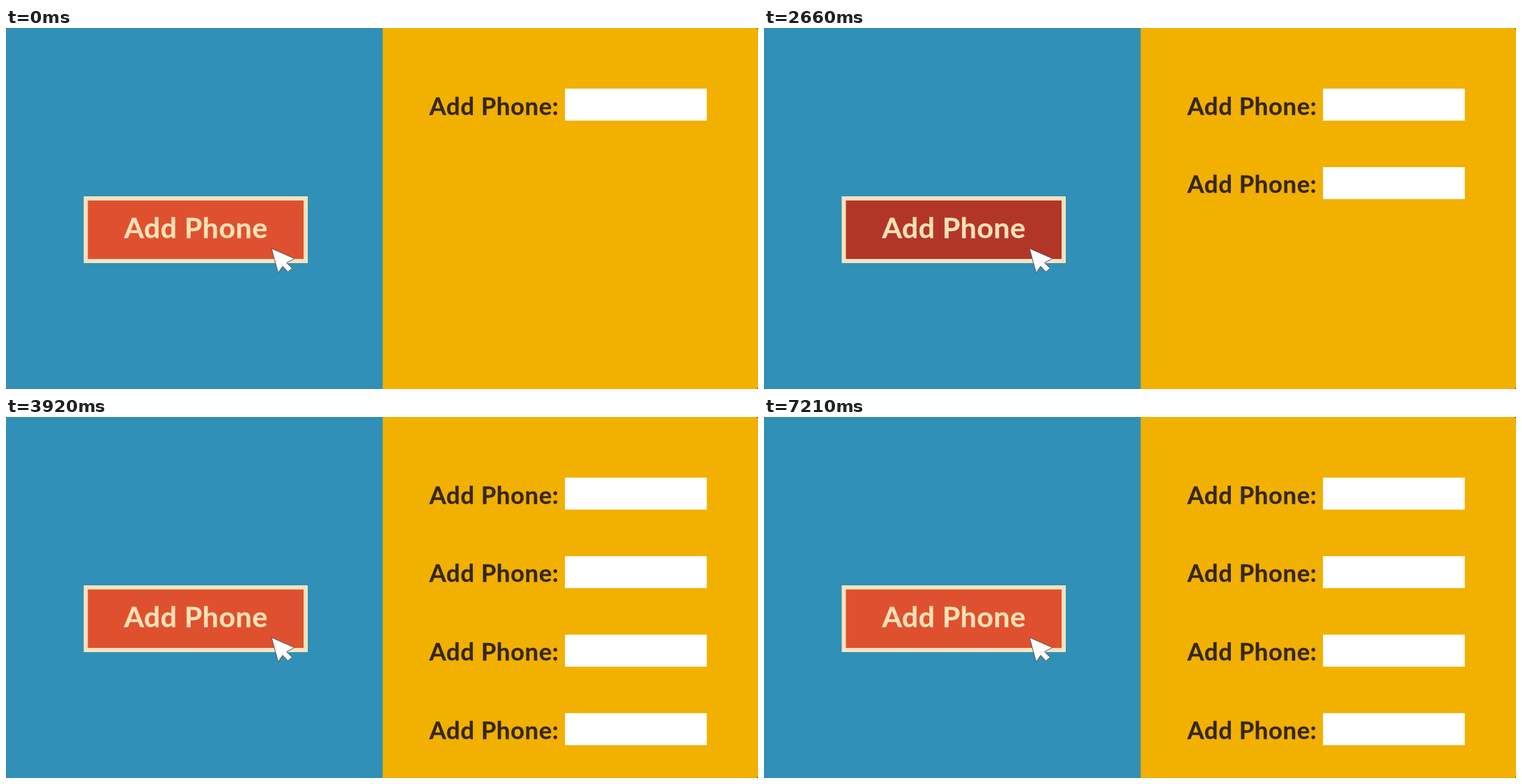
Animation, 1079 px wide and 519 px high, one loop 7280 ms. Source, as an HTML page:

```html
<!DOCTYPE html>
<html lang="en">
<head>
<meta charset="utf-8">
<title>Add Phone</title>
<style>
  html, body { margin: 0; width: 100%; height: 100%; overflow: hidden; background: #2b2b2b; }
  svg { display: block; width: 100vw; height: 100vh; }
  text { font-family: Lato, "Open Sans", sans-serif; font-weight: 700; stroke-width: .3px; }
  .label { font-size: 34.5px; letter-spacing: .75px; fill: #35271a; stroke: #35271a; }
  .caption { font-size: 41px; letter-spacing: .5px; fill: #fbe1b6; stroke: #fbe1b6; }
</style>
</head>
<body>
<svg viewBox="0 0 1079 519" preserveAspectRatio="none">
  <defs>
    <clipPath id="stage"><rect width="1079" height="519" rx="3"/></clipPath>
    <g id="field">
      <text class="label" x="607.5" y="124.6">Add Phone:</text>
      <rect x="802" y="87.2" width="203.5" height="46" fill="#fff"/>
    </g>
  </defs>
  <g clip-path="url(#stage)">
    <rect width="1079" height="519" fill="#f2b000"/>
    <rect width="540.5" height="519" fill="#3190b7"/>
    <rect x="111.5" y="242" width="321.5" height="96" fill="#f6e3c0"/>
    <rect id="face" x="117.5" y="248" width="309.5" height="84"/>
    <text class="caption" x="169.5" y="302">Add Phone</text>
    <path d="M381 317L414 331.5L402.5 337.5L410.5 345.5L404.5 350.5L397 342.5L390.5 352Z"
          fill="#fff" stroke="#5b5660" stroke-width="1" stroke-linejoin="round"/>
    <g id="rows"></g>
  </g>
</svg>
<script>
const LOOP = 7280, STEP = 70;
const FIRST_CLICK = 2520, CLICK_GAP = 350, PRESS = 140;
const ROW_GAP = 112.85, CLICKS = 3;
const UP = [223, 81, 46], DOWN = [178, 54, 39];

const face = document.getElementById("face");
const clamp = v => Math.max(0, Math.min(1, v));

const rows = Array.from({ length: CLICKS + 1 }, (_, i) => {
  const row = document.createElementNS("http://www.w3.org/2000/svg", "use");
  row.setAttribute("href", "#field");
  row.setAttribute("y", i * ROW_GAP);
  document.getElementById("rows").appendChild(row);
  return row;
});

function render(time) {
  const t = Math.floor((time % LOOP) / STEP) * STEP;
  let press = 0;
  for (let i = 0; i < CLICKS; i++) {
    const p = (t - FIRST_CLICK - i * CLICK_GAP) / PRESS;
    press = Math.max(press, clamp(1 - Math.abs(p - 1)));
    rows[i + 1].setAttribute("opacity", clamp(p));
  }
  const mix = UP.map((c, i) => Math.round(c + (DOWN[i] - c) * press));
  face.setAttribute("fill", `rgb(${mix})`);
}

const start = performance.now();
function tick() {
  render(performance.now() - start);
  requestAnimationFrame(tick);
}
render(0);
requestAnimationFrame(tick);
</script>
</body>
</html>
```
